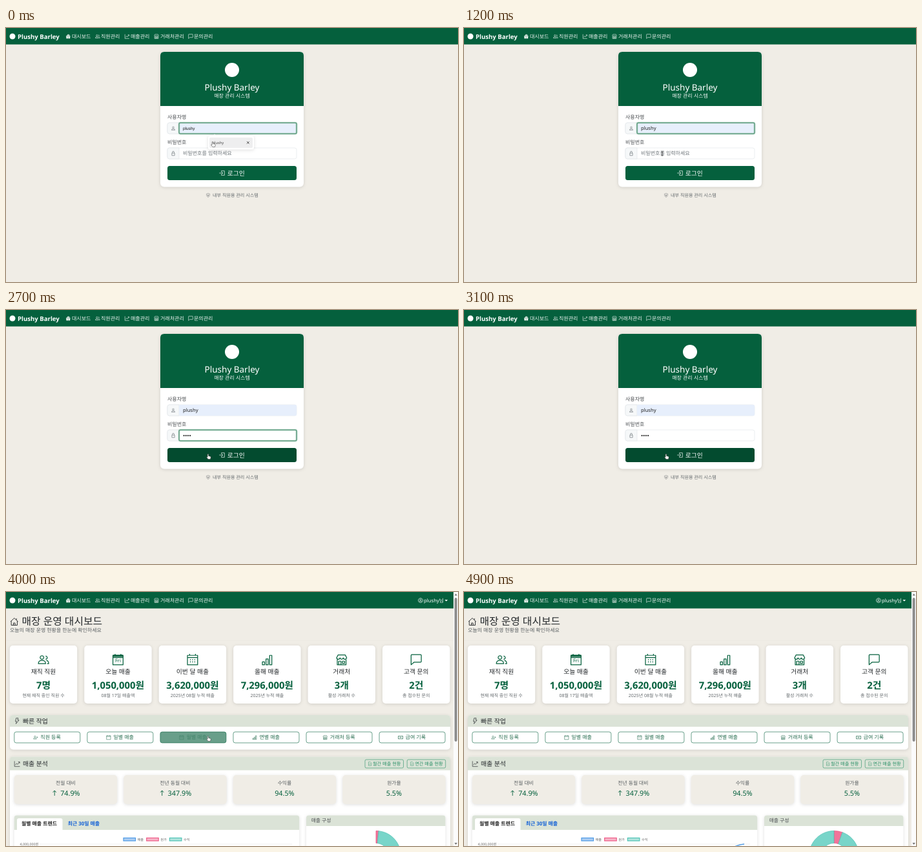
Write an HTML page that moves like this. It is 700 px wide and 394 px high and loops after 5 s.

```html
<!DOCTYPE html>
<html lang="ko">
<head>
<meta charset="utf-8">
<title>매장 관리 시스템</title>
<style>
html, body { margin: 0; width: 100%; height: 100%; overflow: hidden; background: #f0ede6; }
svg { display: block; width: 100vw; height: 100vh; }
text { font-family: "Noto Sans", "Noto Sans CJK KR", "Noto Sans CJK", sans-serif; text-rendering: geometricPrecision; white-space: pre; }
.card { filter: drop-shadow(0 1px 2.5px rgba(0, 0, 0, .13)); }
</style>
</head>
<body>
<svg id="stage" viewBox="0 0 700 394" preserveAspectRatio="none"></svg>
<script>
const GREEN = '#05603d', DARK = '#034b2f', SAGE = '#dbe3d7', BEIGE = '#f0ede6', GRAY = '#646a6d';
const BRAND = 'Plushy Barley', USER = 'plushy';

// Icon strokes on a 16-unit grid
const ICONS = {
  house: 'M1 8 8 1.5 15 8M2.5 7v7.5h11V7M12 2v3M6.5 14.5v-4h3v4',
  people: 'M6 2.5a2.5 2.5 0 1 1-.1 0M1 13.5q0-4.5 5-4.5t5 4.5zM11 3a2.2 2.2 0 1 1 0 4.4M12 9q3.200.4 3.200 4.500h-2.200',
  graph: 'M1 1v14h14M3.500 11 6.500 7l3 2.500L14 3.500M10.500 3H14.500v4',
  shop: 'M3 1.500h10l2 4q-.5 2-2.500 2T10.200 5.500Q9.800 7.500 8 7.500T5.800 5.500Q5.500 7.500 3.500 7.500T1 5.500zM2 7.500v7.500h12V7.500M4 15v-5h3v5M9 10h3v3H9z',
  chat: 'M1 2q0-1 1-1h12q1 0 1 1v8.500q0 1-1 1H5L1 15z',
  person: 'M8 2.500a2.500 2.500 0 1 1-.1 0M2.500 14q0-4.500 5.500-4.500t5.500 4.500z',
  lock: 'M5 7V4q0-3 3-3t3 3v3M3.500 7h9v8h-9z',
  enter: 'M6 5V2h8.500v12H6v-3M0 8h10M7 5l3 3-3 3',
  shield: 'M8 1 14 3q.5 8-6 12Q1.500 11 2 3zM8 5v3.500M6.500 7h3v3h-3z',
  cal: 'M1 2h14v13H1zM1 5h14M4 0v2M12 0v2',
  days: 'M4.500 8h1M7.500 8h1M10.500 8h1M4.500 11h1M7.500 11h1M10.500 11h1',
  bars: 'M1.500 11h3v4h-3zM6.500 7h3v8h-3zM11.500 2h3v13h-3z',
  bolt: 'M6 1h5L9.500 6H13L5.500 15 7 9H4z',
  add: 'M6 2.500a2.500 2.500 0 1 1-.1 0M1 13.500q0-4.500 5-4.500t5 4.500zM13.500 5v5M11 7.500h5',
  cash: 'M0 3h16v10H0zM8 5.700a2.300 2.300 0 1 1-.1 0M0 6q3 0 3-3M16 6q-3 0-3-3M0 10q3 0 3 3M16 10q-3 0-3 3',
  file: 'M3 1h7l3.500 3.500V15H3zM5 11l2-3 2 2 2-3',
  user: 'M8 1a7 7 0 1 1-.1 0M8 4a2.300 2.300 0 1 1-.1 0M3.500 13q1-3 4.500-3t4.500 3'
};

const icon = (name, cx, cy, size, color, sw = 1.1, fill = 'none') =>
  `<path d="${ICONS[name]}" transform="translate(${cx - size / 2} ${cy - size / 2}) scale(${size / 16})" fill="${fill}" stroke="${color}" stroke-width="${sw}" stroke-linejoin="round"/>`;
const text = (x, y, str, size, color, extra = '') =>
  `<text x="${x}" y="${y}" font-size="${size}" fill="${color}" ${extra}>${str}</text>`;
const mid = (x, y, str, size, color, extra = '') => text(x, y, str, size, color, 'text-anchor="middle" ' + extra);
const box = (x, y, w, h, fill, r = 0, extra = '') =>
  `<rect x="${x}" y="${y}" width="${w}" height="${h}" rx="${r}" fill="${fill}" ${extra}/>`;
const topBox = (x, y, w, h, r, fill) =>
  `<path d="M${x} ${y + h}v${r - h}q0 ${-r} ${r} ${-r}h${w - 2 * r}q${r} 0 ${r} ${r}v${h - r}z" fill="${fill}"/>`;
const line = (color, w = .6) => `stroke="${color}" stroke-width="${w}"`;
const BOLD = 'font-weight="700"', CARD = 'class="card"';

function nav() {
  const items = [['house', 96.3, 102, '대시보드'], ['people', 141.800, 147, '직원관리'], ['graph', 187.500, 193, '매출관리'],
    ['shop', 233, 239, '거래처관리'], ['chat', 286, 291, '문의관리']];
  return box(0, 0, 700, 25.500, GREEN) + '<circle cx="10" cy="13" r="4.500" fill="#fff"/>' +
    text(18, 16.600, BRAND, 9.600, '#fff', BOLD) +
    items.map(([n, ix, x, s], i) => icon(n, ix, 13, 7.600, '#f1f6f3', 1.3, i ? 'none' : '#f1f6f3') + text(x, 15.900, s, 8, '#f1f6f3')).join('');
}

function field(y, name, label) {
  return text(250, y - 6.500, label, 8, '#4b4f52') +
    box(250, y, 200, 17, '#fff', 3, line('#dee2e6')) +
    `<path d="M268 ${y}h-15q-3 0-3 3v11q0 3 3 3h15z" fill="#f6f8f9" ${line('#dee2e6')}/>` +
    icon(name, 259, y + 8.500, 7.500, '#5f666b', 1.3);
}
const focusRing = (id, y) => `<g id="${id}">` +
  box(268, y, 182, 17, 'none', 2, line('#a9cdbc', 2.600)) + box(268, y, 182, 17, 'none', 2, line('#3f8767', .9)) + '</g>';

function login() {
  return box(239, 37, 222, 209.500, '#fff', 6, CARD) + topBox(239, 37, 222, 84, 6, GREEN) +
    '<circle cx="350" cy="65" r="11" fill="#fff"/>' +
    mid(350, 97.300, BRAND, 13.500, '#fff') + mid(350, 107.600, '매장 관리 시스템', 8, '#f1f6f3') +
    field(147, 'person', '사용자명') + field(186, 'lock', '비밀번호') +
    box(268, 147, 182, 17, '#e7effc', 2) + focusRing('ring1', 147) + focusRing('ring2', 186) +
    text(274, 158.300, USER, 6.400, '#111', 'id="preview" style="font-family:\'Liberation Sans\',Arial,sans-serif"') +
    text(274, 158.300, USER, 7.600, '#222', 'id="filled"') +
    text(274, 197.300, '비밀번호를 입력하세요', 8, '#70777c', 'id="hint"') +
    [0, 1, 2, 3].map(i => `<circle class="dot" cx="${275.600 + i * 3.150}" cy="194.800" r="1.150" fill="#222"/>`).join('') +
    `<path id="caret" d="M0 0v8.500" ${line('#222', .6)}/>` +
    box(250, 214, 200, 22, GREEN, 3.500, 'id="submit"') + icon('enter', 334.700, 225, 9, '#fff', 1.200) +
    text(342.700, 228.500, '로그인', 9.800, '#fff') +
    icon('shield', 313, 259.600, 7, GRAY) + text(320, 262.300, '내부 직원용 관리 시스템', 7.100, GRAY) +
    `<g id="popup"><g class="card"><path d="M320 167.500l3-3 3 3z" fill="#fff"/>${box(313, 167, 71, 21.500, '#fff', 3)}</g>` +
    box(315, 170, 67, 16, '#eeeeef', 2) + text(319.500, 180, USER, 5.700, '#444') +
    `<path d="M373 176l3.600 3.600m0-3.600l-3.600 3.600" ${line('#222', .8)}/></g>`;
}

function stats() {
  return [['people', '재직 직원', '7명', '현재 재직 중인 직원 수'], ['cal', '오늘 매출', '1,050,000원', '08월 17일 매출액'],
    ['cal', '이번 달 매출', '3,620,000원', '2025년 08월 누적 매출'], ['bars', '올해 매출', '7,296,000원', '2025년 누적 매출'],
    ['shop', '거래처', '3개', '활성 거래처 수'], ['chat', '고객 문의', '2건', '총 접수된 문의']].map(([n, label, val, note], i) => {
    const x = 5.800 + i * 115.450, c = x + 52.200;
    return box(x, 83, 104.400, 90, '#fff', 5, CARD) + icon(n, c, 105, 18, GREEN, 1.100) +
      (i == 1 ? box(c - 7.900, 97.500, 15.800, 3, GREEN) + mid(c, 109.300, 'Fri', 7.500, GREEN) : '') +
      (i == 2 ? icon('days', c, 105, 18, GREEN, 1.500) : '') +
      mid(c, 127, label, 9.800, '#25292c') + mid(c, 149.700, val, 14.800, GREEN, BOLD) + mid(c, 162.600, note, 7, GRAY);
  }).join('');
}

function actions() {
  const items = [['add', '직원 등록'], ['cal', '일별 매출'], ['cal', '월별 매출'], ['bars', '연별 매출'], ['shop', '거래처 등록'], ['cash', '급여 기록']];
  return box(6, 191, 682, 53.500, '#fff', 5, CARD) + topBox(6, 191, 682, 18, 5, SAGE) +
    icon('bolt', 17, 200, 10, '#25292c') + text(26, 203.700, '빠른 작업', 9.900, '#25292c') +
    items.map(([n, s], i) => {
      const x = 12.800 + i * 113.050, c = x + 51, w = s.length > 5 ? 3.700 : 0;
      const label = color => icon(n, c - 18 - w, 225.600, 7.200, color, 1.200) +
        (i == 2 ? icon('days', c - 18, 225.600, 7.200, color, 1.200) : '') + text(c - 10.500 - w, 228.400, s, 8, color);
      return box(x, 217, 102, 17, '#fff', 3, line(GREEN)) + label('#2a6f52') +
        (i == 2 ? `<g id="hoverBg">${box(x, 217, 102, 17, GREEN, 3)}</g><g id="hoverText">${label('#fff')}</g>` : '');
    }).join('');
}

function analysis() {
  const link = (x, s) => box(x, 260, 59.500, 13, 'none', 2, line('#2c9168')) + icon('file', x + 7.500, 266.500, 6.500, '#2c9168', 1.200) +
    text(x + 12, 269.200, s, 7.200, '#2c9168');
  const up = x => `<path d="M${x} 316v-8m-2.600 2.800l2.600-2.800 2.600 2.800" fill="none" ${line(GREEN, .9)}/>`;
  const metrics = [['전월 대비', '74.9%'], ['전년 동월 대비', '347.9%'], ['수익률', '94.5%'], ['원가율', '5.5%']].map(([s, v], i) => {
    const x = 12.700 + i * 169.500, c = x + 79.700, rise = i < 2;
    return box(x, 284, 159.500, 45, BEIGE, 5, CARD) + mid(c, 299.200, s, 7.800, '#5b6063') +
      mid(c + (rise ? 7 : 0), 316, v, 10.800, GREEN) + (rise ? up(c - (i ? 20.200 : 17.200)) : '');
  }).join('');
  const legend = [['#4f9be6', '#a9ccf2', '매출'], ['#ee5c88', '#f6b3c7', '원가'], ['#4fc4b5', '#aee3dc', '수익']].map(([a, b, s], i) =>
    box(182 + i * 35.700, 381.500, 18.500, 4.500, b, 0, line(a, 1.200)) + text(203.500 + i * 35.700, 385.500, s, 5.200, '#666')).join('');
  return box(6, 255.500, 682, 160, '#fff', 5, CARD) + topBox(6, 255.500, 682, 21, 5, SAGE) +
    icon('graph', 17.300, 266.500, 9.500, '#25292c') + text(26, 270, '매출 분석', 9.900, '#25292c') +
    link(556, '월간 매출 현황') + link(621.200, '연간 매출 현황') + metrics +
    box(12.700, 346.500, 441.500, 70, '#fff', 4, CARD) + topBox(12.700, 346.500, 441.500, 22.500, 4, SAGE) +
    topBox(17, 351, 70.500, 18.500, 3, '#fff') +
    text(24, 362.300, '월별 매출 트렌드', 7.900, '#222', BOLD) + text(95.700, 362.300, '최근 30일 매출', 7.900, '#1260d6', BOLD) +
    legend + text(21.500, 393, '4,000,000원', 5.300, '#666') + `<path d="M52 391h391" ${line('#e4e4e4')}/>` +
    `<path id="trend" d="M392 412Q416 392.500 434 391" fill="none" ${line('#4f9be6', 1.500)}/>` +
    box(465, 346.500, 215.500, 70, '#fff', 4, CARD) + topBox(465, 346.500, 215.500, 16.500, 4, SAGE) +
    text(472.700, 357.300, '매출 구성', 7.800, '#4b4f52') +
    `<path id="cost" fill="#f1749a" ${line('#e8517f', .7)}/><path id="profit" fill="#78d5c9" ${line('#4fc0b3', .7)}/>`;
}

function dashboard() {
  return icon('user', 642, 13, 7.800, '#fff', 1.400) + text(647, 15.900, USER + '님', 7.700, '#fff') +
    '<path d="M679.500 12h4.600l-2.300 2.400z" fill="#fff"/>' +
    icon('house', 12.800, 46, 13.500, '#25292c') + text(24.500, 51.300, '매장 운영 대시보드', 15.800, '#25292c') +
    text(6, 62.200, '오늘의 매장 운영 현황을 한눈에 확인하세요', 7.950, '#5b6063') +
    `<path d="M0 75.500h693" ${line('#e8e5dd', .5)}/>` + stats() + actions() + analysis() +
    box(693, 0, 7, 394, '#fbfbfb') + box(694.600, 9, 4, 223, '#8c8c8c', 2) +
    '<path d="M694.500 5.500h4.400l-2.200-3zM694.500 389h4.400l-2.200 3z" fill="#777"/>';
}

const POINTERS = {
  hand: `<path d="M-1.900-3.200q.8-1.200 1.600 0v2.600l2.500.6q1.300.4 1 1.900l-.7 2.500h-3.600l-2.300-3.100q.1-1.100 1.500 0z" fill="#fff" ${line('#222', .5)}/>`,
  beam: `<path d="M-1.300-3h2.600M0-3v6M-1.300 3h2.600" fill="none" ${line('#222', .7)}/>`,
  arrow: `<path d="M-1-3v7.200l1.700-1.600 1.100 2.500 1-.5-1.100-2.400h2.300z" fill="#fff" ${line('#222', .5)}/>`
};

document.getElementById('stage').innerHTML = box(0, 0, 700, 394, BEIGE) + nav() +
  `<g id="login">${login()}</g><g id="dash">${dashboard()}</g><g id="pointer">` +
  Object.keys(POINTERS).map(k => `<g id="${k}">${POINTERS[k]}</g>`).join('') + '</g>';

const $ = id => document.getElementById(id);
const show = (el, on) => el.setAttribute('visibility', on ? 'visible' : 'hidden');
const dots = [...document.querySelectorAll('.dot')];

const LOOP = 5000, STEP = 100, PICK = 400, FOCUS = 1300, SEND = 3100, OPEN = 4000;
const KEYS = [1600, 1900, 2000, 2200];
const MOVES = [[0, 321, 180], [500, 321, 180], [1000, 307, 195], [2300, 307, 195], [2600, 314, 227], [4300, 314, 227], [4700, 306, 412], [5000, 306, 412]];

function pointerAt(t) {
  const i = MOVES.findIndex((m, k) => k && t < m[0]);
  const [t0, x0, y0] = MOVES[i - 1], [t1, x1, y1] = MOVES[i];
  const p = (t - t0) / (t1 - t0), e = p * p * (3 - 2 * p);
  return [x0 + (x1 - x0) * e, y0 + (y1 - y0) * e];
}

function ring(a0, a1, cx = 573, cy = 409, R = 38.500, r = 19.500) {
  const at = (rad, a) => `${cx + rad * Math.sin(a)} ${cy - rad * Math.cos(a)}`;
  const big = a1 - a0 > Math.PI ? 1 : 0;
  return `M${at(R, a0)}A${R} ${R} 0 ${big} 1 ${at(R, a1)}L${at(r, a1)}A${r} ${r} 0 ${big} 0 ${at(r, a0)}z`;
}

function drawLogin(t, y) {
  const picked = t >= PICK, typing = t >= FOCUS && t < SEND;
  const count = KEYS.filter(k => t >= k).length;
  show($('popup'), !picked);
  show($('preview'), !picked);
  show($('filled'), picked);
  show($('ring1'), t < FOCUS);
  show($('ring2'), typing);
  show($('hint'), !count);
  dots.forEach((d, i) => show(d, i < count));
  const last = typing ? (count ? KEYS[count - 1] : FOCUS) : PICK;
  show($('caret'), picked && t < SEND && (t - last) % 1000 < 500);
  $('caret').setAttribute('transform', typing ? `translate(${274.300 + count * 3.150} 190.300)` : 'translate(295.500 151.300)');
  $('submit').setAttribute('fill', y > 214 ? DARK : GREEN);
}

function drawDash(t, y) {
  const hover = y > 236 ? 0 : Math.min(1, .6 + (t - OPEN) / 200);
  $('hoverBg').setAttribute('opacity', hover);
  $('hoverText').setAttribute('opacity', hover < 1 ? hover * .4 : 1);
  const p = Math.min(1, (t - OPEN + 85) / 1000), e = 1 - (1 - p) ** 4;
  const full = 2 * Math.PI * e, cut = full * .055;
  $('cost').setAttribute('d', ring(0, cut));
  $('profit').setAttribute('d', ring(cut, Math.min(full, 6.282)));
  $('trend').setAttribute('transform', `translate(0 ${(1 - e) * 90})`);
}

function draw(now) {
  const t = Math.floor((now % LOOP) / STEP) * STEP;
  const [x, y] = pointerAt(t), opened = t >= OPEN;
  $('login').style.display = opened ? 'none' : '';
  $('dash').style.display = opened ? '' : 'none';
  if (opened) drawDash(t, y); else drawLogin(t, y);
  const kind = t <= 500 || (y > 214 && y < 236) ? 'hand' : !opened && y > 186 && y < 203 ? 'beam' : 'arrow';
  Object.keys(POINTERS).forEach(k => show($(k), k == kind));
  $('pointer').setAttribute('transform', `translate(${x} ${y})`);
}

const start = performance.now();
function tick() {
  draw(performance.now() - start);
  requestAnimationFrame(tick);
}
tick();
</script>
</body>
</html>
```
